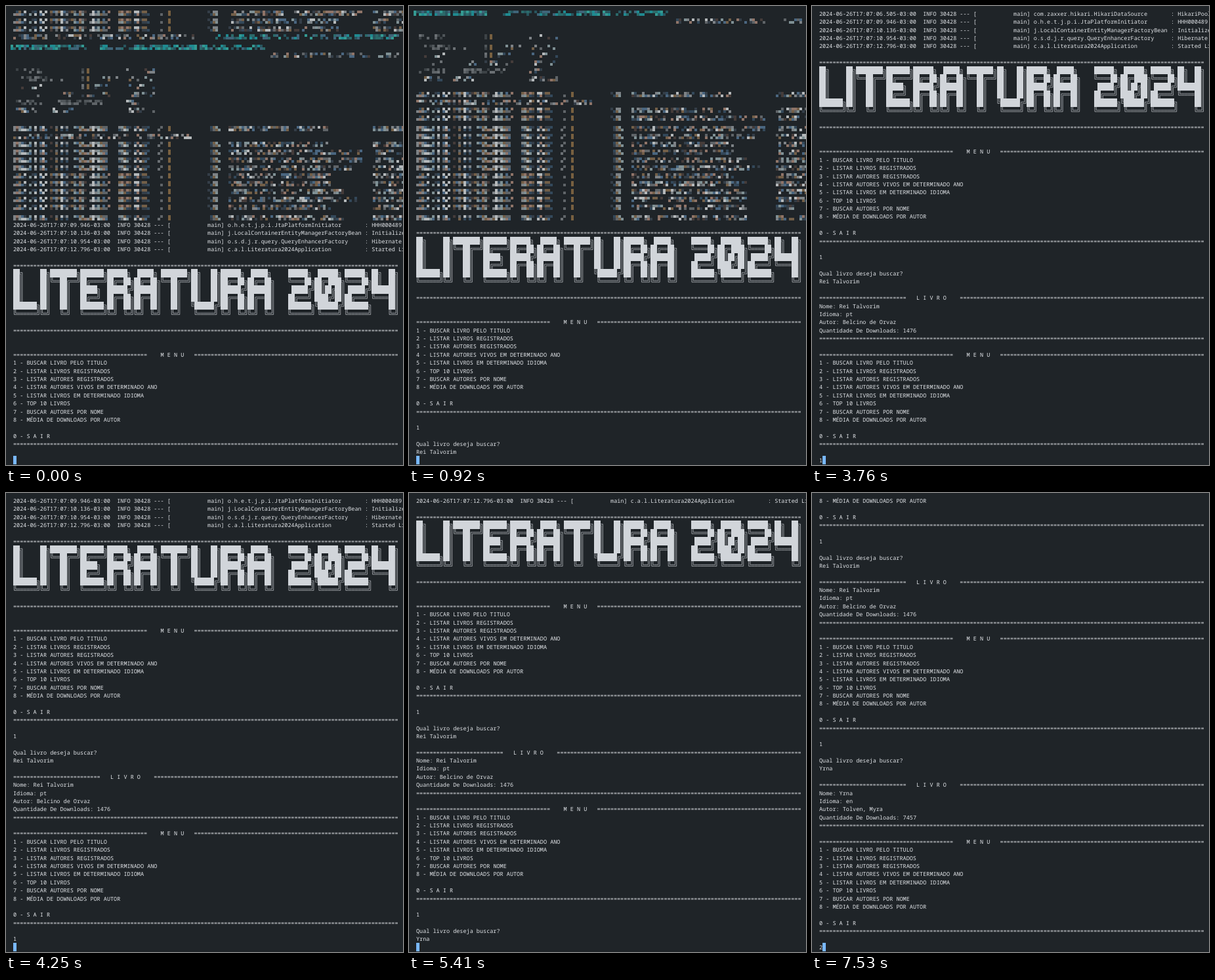
Animation of 605x700 px, one loop 8 s. Source, as an HTML page with a canvas:

```html
<!DOCTYPE html>
<html lang="pt">
<head>
<meta charset="utf-8">
<title>Terminal</title>
<style>
  html, body { margin: 0; width: 100%; height: 100%; overflow: hidden; background: #1f2428; }
  canvas { display: block; width: 605px; height: 700px; }
</style>
</head>
<body>
<canvas id="stage" width="605" height="700"></canvas>
<script>
const ctx = document.getElementById('stage').getContext('2d');
const LOOP = 8000, ROWS = 56, LEFT = 11, TOP = 5.31, CELL_W = 5.104, CELL_H = 12.38;
const BG = '#1f2428', INK = '#e1e4e8', BLOCK = '#d1d5da', CURSOR = '#79b8ff';
const GREY = ['#b4b8ba', '#7d8286', '#5f6468', '#735f48', '#4a6680', '#343e48', '#8f7468', '#453c3a', '#7f9094', '#33485a'];
const DIM = ['#6b7074', '#50565a', '#5f6468', '#3c4246'];
const TEAL = ['#1f8a90', '#2b6a6a', '#349a92', '#28555e', '#3f6478'];
const BROWN = ['#786040'];

// ---- Terminal contents ----
const rule = n => '='.repeat(n);
const heading = (before, gap, title, gapAfter) =>
  (rule(before) + ' '.repeat(gap) + title + ' '.repeat(gapAfter)).padEnd(115, '=');

const GLYPHS = {
  L: '██╗     /██║     /██║     /██║     /███████╗/╚══════╝',
  I: '██╗/██║/██║/██║/██║/╚═╝',
  T: '████████╗/╚══██╔══╝/   ██║   /   ██║   /   ██║   /   ╚═╝   ',
  E: '███████╗/██╔════╝/█████╗  /██╔══╝  /███████╗/╚══════╝',
  R: '██████╗ /██╔══██╗/██████╔╝/██╔══██╗/██║  ██║/╚═╝  ╚═╝',
  A: ' █████╗ /██╔══██╗/███████║/██╔══██║/██║  ██║/╚═╝  ╚═╝',
  U: '██╗   ██╗/██║   ██║/██║   ██║/██║   ██║/╚██████╔╝/ ╚═════╝ ',
  2: '██████╗ /╚════██╗/ █████╔╝/██╔═══╝ /███████╗/╚══════╝',
  0: ' ██████╗ /██╔═████╗/██║██╔██║/████╔╝██║/╚██████╔╝/ ╚═════╝ ',
  4: '██╗  ██╗/██║  ██║/███████║/╚════██║/     ██║/     ╚═╝',
  ' ': '    /    /    /    /    /    '
};
const banner = [0, 1, 2, 3, 4, 5].map(row =>
  [...'LITERATURA 2024'].map(ch => GLYPHS[ch].split('/')[row]).join(''));

const menu = [
  heading(40, 4, 'M E N U', 3),
  '1 - BUSCAR LIVRO PELO TITULO',
  '2 - LISTAR LIVROS REGISTRADOS',
  '3 - LISTAR AUTORES REGISTRADOS',
  '4 - LISTAR AUTORES VIVOS EM DETERMINADO ANO',
  '5 - LISTAR LIVROS EM DETERMINADO IDIOMA',
  '6 - TOP 10 LIVROS',
  '7 - BUSCAR AUTORES POR NOME',
  '8 - MÉDIA DE DOWNLOADS POR AUTOR',
  '', '0 - S A I R', rule(115)
];
const book = (name, language, author, downloads) => [
  '', heading(26, 3, 'L I V R O', 4),
  'Nome: ' + name, 'Idioma: ' + language, 'Autor: ' + author,
  'Quantidade De Downloads: ' + downloads, rule(115), '', ...menu, ''
];
const log = (time, logger, message) =>
  `2024-06-26T17:07:${time}-03:00  INFO 30428 --- [${'main'.padStart(15)}] ${logger.padEnd(40)} : ${message}`;

// Censored lines are runs of [first column, end column, density, palette].
const logRuns = end => [
  [0, 7, .65, GREY], [8, 10, .65, GREY], [11, 29, .68, GREY], [31, 35, .85, GREY], [36, 41, .8, GREY],
  [42, 45, .3, DIM], [46, 47, 1, BROWN], [58, 63, .5, GREY], [64, end, .6, GREY], [107, 117, .65, GREY]
];
const bars = [[20, 21, 1, DIM], [22, 23, 1, BROWN]];
const hidden = [
  ...[104, 97, 98].map(logRuns),
  [[0, 54, .45, GREY], [60, 115, .5, TEAL]],
  [[-1, 22, .7, TEAL], [26, 75, .7, TEAL]],
  [[77, 115, .5, GREY]],
  [],
  [[1, 9, .3, DIM], ...bars, [34, 42, .35, GREY]],
  [[1, 15, .3, DIM], ...bars, [27, 42, .25, GREY]],
  [[2, 9, .25, GREY], ...bars, [24, 28, .4, GREY], [34, 42, .25, GREY]],
  [[3, 12, .25, DIM], [15, 30, .3, GREY], [35, 42, .35, GREY]],
  [[1, 9, .5, DIM], [13, 27, .5, DIM], [34, 38, .4, GREY]],
  [[1, 9, .5, GREY], [11, 18, .5, GREY], [34, 42, .5, GREY]],
  [],
  logRuns(95),
  [[0, 53, .5, GREY]],
  ...[94, 104, 104, 103, 95, 95, 99, 103, 95].map(logRuns)
];

const lines = [
  ...hidden,
  log('06.505', 'com.zaxxer.hikari.HikariDataSource', 'HikariPool-1'),
  log('09.946', 'o.h.e.t.j.p.i.JtaPlatformInitiator', 'HHH000489: No'),
  log('10.136', 'j.LocalContainerEntityManagerFactoryBean', 'Initialized'),
  log('10.954', 'o.s.d.j.r.query.QueryEnhancerFactory', 'Hibernate is'),
  log('12.796', 'c.a.l.Literatura2024Application', 'Started Literatura'),
  '', rule(115), ...banner, '', rule(115), '', '', ...menu, ''
];

// ---- Timeline ----
const FIRST = 'Rei Talvorim', SECOND = 'Yrna', QUESTION = 'Qual livro deseja buscar?';
const states = [];
function at(time, typed, output = [], look = {}) {
  lines.push(...output);
  states.push({ time, typed, count: lines.length, ...look });
}
const censored = { mosaic: true };
at(0, '', [], censored);
at(190, '1', [], censored);
at(370, '', ['1', '', QUESTION], censored);
at(560, FIRST, [], censored);
at(920, '', [FIRST], censored);
at(1230, '', book(FIRST, 'pt', 'Belcino de Orvaz', 1476), { hollow: true });
at(3120, '');
at(3760, '1');
at(4250, '', ['1']);
at(4330, '', ['', QUESTION]);
at(4620, SECOND);
at(5410, '', [SECOND]);
at(5710, '', book(SECOND, 'en', 'Tolven, Myra', 7457));
at(7530, '2');

// ---- Drawing ----
const rowY = row => TOP + row * CELL_H;
const colX = col => LEFT + col * CELL_W;
function hash(n) {
  n = Math.imul(n ^ (n >>> 15), 0x2c1b3c6d) + 0x9e3779b9;
  n = Math.imul(n ^ (n >>> 12), 0x297a2d39);
  return ((n ^ (n >>> 15)) >>> 0) / 2 ** 32;
}

function drawText(text, row) {
  ctx.fillStyle = INK;
  for (const word of text.matchAll(/\S+/g))
    ctx.fillText(word[0], colX(word.index), Math.round(rowY(row) + 9.6));
}

const CORNERS = { '╔': [1, 1], '╗': [-1, 1], '╚': [1, -1], '╝': [-1, -1] };
function drawBanner(text, row) {
  const y0 = Math.round(rowY(row)), y1 = Math.round(rowY(row + 1)), cy = (y0 + y1) / 2;
  ctx.fillStyle = BLOCK;
  ctx.strokeStyle = '#b4b8bd';
  ctx.lineWidth = .8;
  ctx.beginPath();
  [...text].forEach((ch, col) => {
    const x0 = colX(col), x1 = colX(col + 1), cx = (x0 + x1) / 2;
    if (ch === '█') {
      const left = Math.round(x0);
      ctx.fillRect(left, y0, Math.round(x1) - left, y1 - y0);
    }
    for (const side of [-1.1, 1.1]) {
      if (ch === '═') { ctx.moveTo(x0, cy + side); ctx.lineTo(x1, cy + side); }
      if (ch === '║') { ctx.moveTo(cx + side, y0); ctx.lineTo(cx + side, y1); }
      if (CORNERS[ch]) {
        const [dx, dy] = CORNERS[ch];
        ctx.moveTo(dx > 0 ? x1 : x0, cy - side * dy);
        ctx.lineTo(cx - side * dx, cy - side * dy);
        ctx.lineTo(cx - side * dx, dy > 0 ? y1 : y0);
      }
    }
  });
  ctx.stroke();
}

function drawMosaic(top) {
  const size = 4;
  for (let y = 3; y < 327; y += size) {
    const pos = (y + size / 2 - TOP) / CELL_H, row = Math.floor(pos), phase = pos - row;
    if (row < 0 || phase < .2 || phase > .84) continue;
    const index = top + row, line = lines[index];
    const runs = typeof line === 'string' ? (line ? logRuns(99) : []) : line;
    for (let x = 3; x < 605; x += size) {
      const col = (x + size / 2 - LEFT) / CELL_W;
      const run = runs.find(([start, end]) => col >= start && col < end);
      if (!run) continue;
      // Log prefixes repeat, so their blocks line up from row to row.
      const shared = runs.length === 10 && col < 64;
      const seed = x + Math.floor(phase * 3) * 613 + (shared ? 0 : index * 1171);
      if (hash(seed) > run[2]) continue;
      const palette = run[3];
      ctx.fillStyle = palette[Math.floor(hash(seed + 70001) * palette.length)];
      ctx.fillRect(x, y, size, size);
    }
  }
}

function drawCursor(col, hollow) {
  const x = Math.round(colX(col)), y = 686;
  ctx.fillStyle = ctx.strokeStyle = CURSOR;
  ctx.lineWidth = 1;
  if (hollow) ctx.strokeRect(x + .5, y + .5, 4, 12);
  else ctx.fillRect(x, y, 5, 13);
}

function draw({ count, typed, mosaic, hollow }) {
  ctx.fillStyle = BG;
  ctx.fillRect(0, 0, 605, 700);
  ctx.font = `500 ${CELL_W / .6}px "Noto Sans Mono", "DejaVu Sans Mono", monospace`;
  ctx.textRendering = 'geometricPrecision';
  const top = count + 1 - ROWS;
  if (mosaic) drawMosaic(top);
  for (let row = mosaic ? 26 : 0; row < ROWS - 1; row++) {
    const text = lines[top + row];
    (/[█═║]/.test(text) ? drawBanner : drawText)(text, row);
  }
  drawText(typed, ROWS - 1);
  drawCursor(typed.length, hollow);
}

let shown;
function tick(now) {
  const time = now % LOOP;
  const state = states.findLast(s => s.time <= time);
  if (state !== shown) draw(shown = state);
  requestAnimationFrame(tick);
}
tick(0);
</script>
</body>
</html>
```
